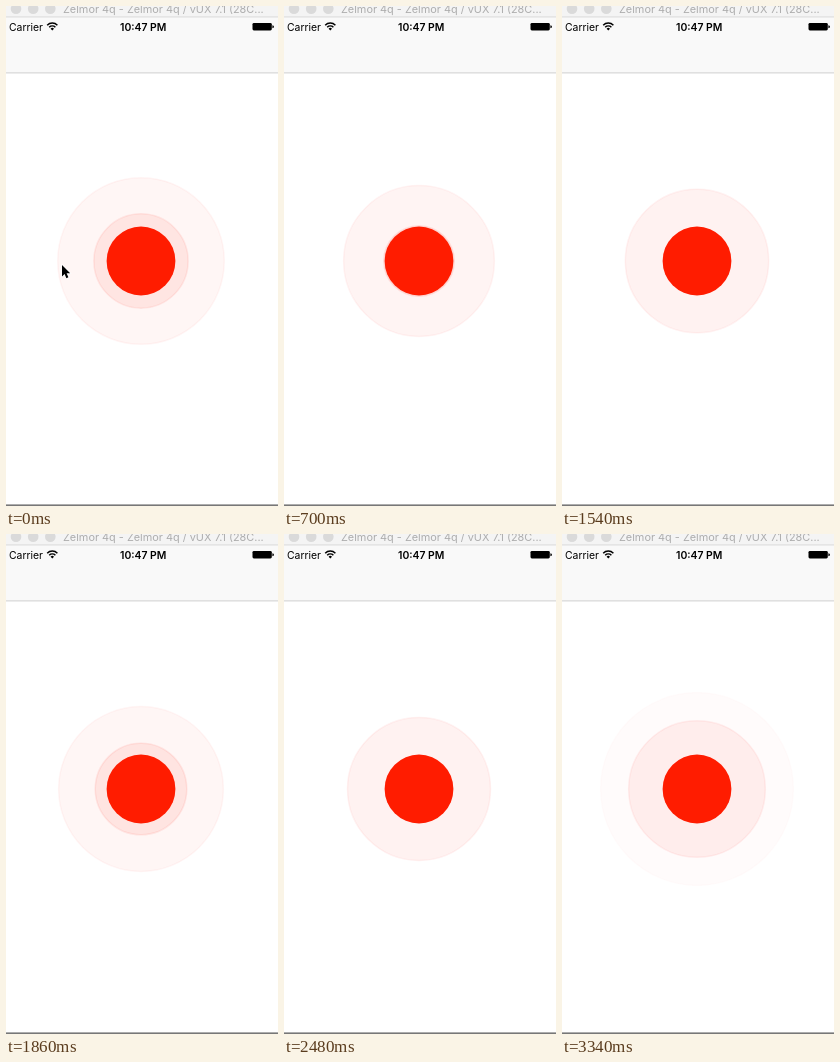
An HTML page for the animation above (3.38 s loop, 272x500 px).

```html
<!DOCTYPE html>
<html lang="en">
<head>
<meta charset="utf-8">
<title>Pulse</title>
<style>
  html, body { margin: 0; width: 100%; height: 100%; overflow: hidden; background: #fff; }
  svg { display: block; width: 100%; height: 100%; }
  text { font-family: Inter, "Liberation Sans", sans-serif; }
  #rings { fill: #ff1c00; stroke: #ff1c00; stroke-width: 1.5; }
</style>
</head>
<body>
<svg viewBox="0 0 272 500">
  <rect width="272" height="500" fill="#fff"/>

  <!-- window title -->
  <rect width="272" height="11" fill="#f4f4f4"/>
  <g fill="#dadada">
    <circle cx="10" cy="2.8" r="5.3"/>
    <circle cx="27.2" cy="2.8" r="5.3"/>
    <circle cx="44.3" cy="2.8" r="5.3"/>
  </g>
  <text x="57" y="7" font-size="10.9" fill="#adadad">Zelmor 4q - Zelmor 4q / vUX 7.1 (28C...</text>
  <rect y="10.6" width="272" height="1" fill="#cecece"/>

  <!-- status and navigation bar -->
  <rect y="11.6" width="272" height="55" fill="#f9f9f9"/>
  <rect y="66.4" width="272" height="1" fill="#cfcfcf"/>
  <text x="3" y="24.8" font-size="10.4">Carrier</text>
  <text x="137.2" y="24.8" font-size="10.4" font-weight="600" text-anchor="middle">10:47 PM</text>
  <g fill="none" stroke="#000" stroke-width="1.5">
    <path d="M41.2 19.2a7.2 7.2 0 0 1 10.2 0"/>
    <path d="M43.2 21.3a4.4 4.4 0 0 1 6.2 0"/>
  </g>
  <path d="M46.3 24.6l-1.7-1.9a2.4 2.4 0 0 1 3.4 0z"/>
  <rect x="246.5" y="16.9" width="19.3" height="7.6" rx="1.4"/>
  <path d="M266.4 19.2q1.6 .3 1.6 1.5t-1.6 1.5z"/>

  <g id="rings"></g>
  <circle cx="135" cy="255" r="34.4" fill="#ff1c00"/>

  <path id="cursor" d="M0 0v11.4l2.6-2.4 1.8 4.2 2-.9-1.8-4h3.6z" stroke="#fff" stroke-width="1.2" paint-order="stroke"/>
  <rect y="498.4" width="272" height="1.6" fill="#777"/>
</svg>
<script>
  const LOOP = 3380, GAP = 945, FADE = 1800, LIFE = 1500;
  const group = document.getElementById('rings');
  const cursor = document.getElementById('cursor');

  const rings = [-1, 0, 1, 2, 3].map(k => {
    const el = document.createElementNS('http://www.w3.org/2000/svg', 'circle');
    el.setAttribute('cx', 135);
    el.setAttribute('cy', 255);
    group.prepend(el);
    return { el, start: k * GAP };
  });

  // Decelerating growth; age 0 is shortly after the ring clears the dot.
  const radius = age => 47.5 + 0.0463 * age - 8.5e-6 * age * age;

  function draw(t) {
    for (const { el, start } of rings) {
      const age = t - start;
      const shown = age > -400 && age < LIFE;
      el.setAttribute('visibility', shown ? 'visible' : 'hidden');
      if (!shown) continue;
      const left = 1 - age / FADE;
      el.setAttribute('r', radius(age) - 0.4);
      el.setAttribute('fill-opacity', 0.08 * left);
      el.setAttribute('stroke-opacity', 0.08 * left);
    }
    const p = Math.min(1, t / 300);
    cursor.setAttribute('transform', `translate(${56 - 68 * p * p} ${259 + 4 * p})`);
  }

  const t0 = performance.now();
  function tick() {
    draw((performance.now() - t0) % LOOP);
    requestAnimationFrame(tick);
  }
  draw(0);
  requestAnimationFrame(tick);
</script>
</body>
</html>
```
